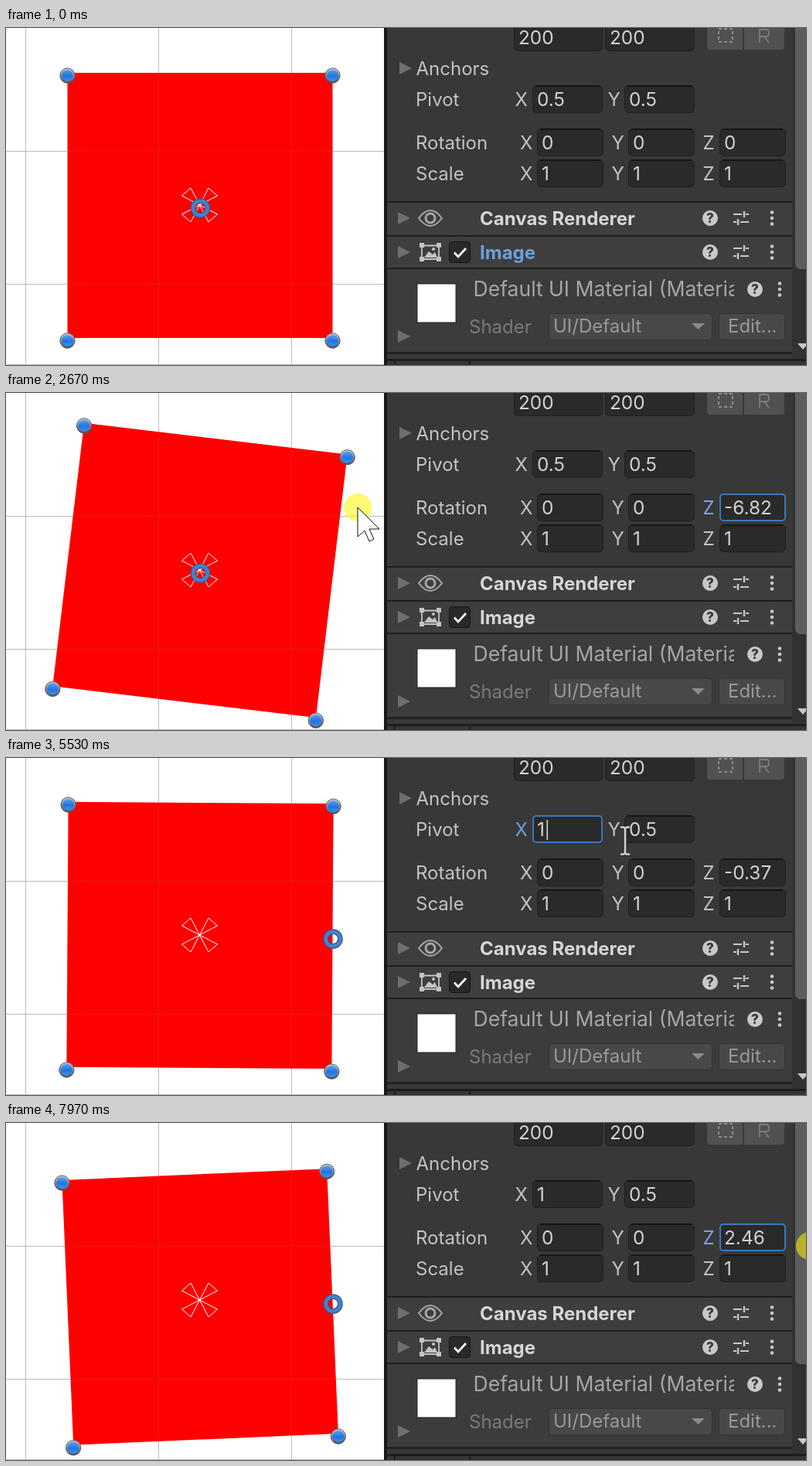
An HTML page that plays this animation: 1035x436 px, repeating every 8 s.

```html
<!DOCTYPE html>
<html lang="en">
<head>
<meta charset="utf-8">
<title>Rotation and pivot</title>
<style>
html, body { margin: 0; width: 100%; height: 100%; overflow: hidden; background: #fff; }
svg { display: block; width: 1035px; height: 436px; font-family: Inter, "Open Sans", sans-serif; }
text { white-space: pre; }
</style>
</head>
<body>
<svg id="stage" viewBox="0 0 1035 436" xmlns="http://www.w3.org/2000/svg"></svg>
<script>
const LOOP = 8000;
const stage = document.getElementById('stage');

// ---------- drawing helpers ----------
const rect = (x, y, w, h, fill, more = '') =>
  `<rect x="${x}" y="${y}" width="${w}" height="${h}" fill="${fill}" ${more}/>`;
const text = (x, y, s, fill = '#c4c4c4', size = 24, more = '') =>
  `<text x="${x}" y="${y}" fill="${fill}" font-size="${size}" ${more}>${s}</text>`;
const path = (d, fill, more = '') => `<path d="${d}" fill="${fill}" ${more}/>`;
const line = (d, color, w) => path(d, 'none', `stroke="${color}" stroke-width="${w}"`);

const fold = (x, y) => path(`M${x} ${y - 8}l16 8l-16 8z`, '#6e6e6e');

const BASE = 26.6; // text baseline below the top of a row
const field = (x, y, w, value, id = '') =>
  rect(x + .5, y + .5, w - 1, 35, '#2a2a2a', `rx="5" stroke="#1f1f1f"`) +
  line(`M${x + 4} ${y + 1}h${w - 8}`, '#101010', 1.5) +
  (id && rect(x + 5, y + 5, 42, 26, '#3d6091', `id="${id}Sel" visibility="hidden"`)) +
  text(x + 6, y + BASE, value, '#d2d2d2', 24.4, id && `id="${id}Val"`) +
  (id && rect(x + 1, y + 1, w - 2, 34, 'none', `rx="4" stroke="#3a79bb" stroke-width="2" id="${id}Focus"`));

const help = (x, y) => `<circle cx="${x}" cy="${y}" r="10" fill="#c8c8c8"/>` +
  text(x, y + 6, '?', '#383838', 17, 'font-weight="800" text-anchor="middle"');
const dots = (x, y) => [-7.5, 0, 7.5].map(d => `<circle cx="${x}" cy="${y + d}" r="2.3" fill="#c8c8c8"/>`).join('');
const sliders = (x, y) =>
  line(`M${x - 10} ${y - 5}h11M${x + 6} ${y - 5}h4M${x - 10} ${y + 5}h4M${x - 1} ${y + 5}h11`, '#c8c8c8', 2.2) +
  line(`M${x + 4} ${y - 9}v8M${x - 4} ${y + 1}v8`, '#c8c8c8', 2.4);
const headIcons = y => help(911, y) + sliders(951, y) + dots(991, y);

const ring = `<g id="ring"><circle r="9.4" fill="none" stroke="#35588c" stroke-width="6.8"/>
  <circle r="9.4" fill="none" stroke="#4680cc" stroke-width="4.4"/></g>`;
const blade = path('M0 0L11.5 -22L23 -12Z', 'none', 'stroke="#fff" stroke-width="1"');
const gizmo = [[1, 1], [-1, 1], [1, -1], [-1, -1]]
  .map(([a, b]) => `<g transform="translate(250.500 229) scale(${a} ${b})">${blade}</g>`).join('');
const knob = `<g class="knob"><circle r="10" fill="url(#rim)"/><circle r="9.6" fill="none" stroke="#4a5260" stroke-width=".8"/>
  <circle r="7.3" fill="url(#blue)"/></g>`;
const grid = alpha =>
  line('M25.5 0V436M197.500 0V436M369.500 0V436M0 159.500H489M0 331.500H489', `rgba(125,125,125,${alpha})`, 1);

const ARROW = 'M0 0V38L9 30L15 44L21 41L15 28H28Z';
const BEAM = 'M-6 -17.5H-2L0 -16L2 -17.5H6M0 -16V16M-6 17.5H-2L0 16L2 17.5H6';
const cursors = `<g id="pointer"><circle id="halo" r="18" fill="#fff500" fill-opacity=".55"/>
  <g id="arrow">${path(ARROW, '#fff', 'stroke="#111"')}</g>
  <g id="scrub">${path(ARROW, '#f2f2f2', 'stroke="#222" stroke-width="1.2" transform="translate(-1 -2) scale(.66)"')}
    ${path('M-11 3l6 -5v10zM16 3l-6 -5v10z', '#f2f2f2', 'stroke="#222" stroke-width=".6"')}</g>
  <g id="beam">${line(BEAM, '#2a2a2a', 5)}${line(BEAM, '#d0d0d0', 2.6)}</g></g>`;

// ---------- static layout ----------
function inspector() {
  const row = (y, label) => text(530, y + BASE, label);
  const axis = (x, y, s, id = '') => text(x, y + BASE, s, '#c4c4c4', 24, id && `id="${id}"`);
  const dark = '#1e1e1e';
  return rect(489, 0, 546, 436, '#383838') + rect(489, 0, 4, 436, '#191919') +
    // size, anchors, pivot
    field(657, -6, 115, '200') + field(775, -6, 116, '200') +
    rect(907, -10, 100, 38, '#515151', 'rx="4"') + rect(953, 0, 2, 28, '#383838') +
    rect(922, 1, 18, 17, 'none', 'stroke="#8c8c8c" stroke-width="2" stroke-dasharray="4 3"') +
    line('M975 19V2H984Q987 2 987 6.500T984 11H975M981 11L987 19', '#7c7c7c', 1.8) +
    fold(509, 52) + text(530.5, 60.7, 'Anchors') +
    row(74, 'Pivot') + axis(658.5, 74, 'X', 'pxLabel') + field(681, 74, 91, '0.5', 'px') +
    rect(699.5, 80, 1.5, 26, '#d8d8d8', 'id="caret"') +
    axis(778.5, 74, 'Y') + field(800, 74, 91, '0.5') +
    // rotation, scale
    ['Rotation', 'Scale'].map((s, i) => {
      const y = 130 + 40 * i;
      return row(y, s) + axis(665, y, 'X') + field(687, y, 86, i) +
        axis(783.5, y, 'Y') + field(805, y, 86, i) +
        axis(901.5, y, 'Z', i ? '' : 'rzLabel') + field(923, y, 86, i, i ? '' : 'rz');
    }).join('') +
    // component headers
    rect(493, 225, 524, 86, '#3e3e3e') +
    [224, 268, 310].map(y => rect(493, y, 524, 2, dark)).join('') +
    fold(507, 246) + fold(507, 290) +
    line('M534 246Q549 226 564 246Q549 266 534 246Z', '#a6a6a6', 2) +
    '<circle cx="549" cy="246" r="6" fill="#3e3e3e" stroke="#a6a6a6" stroke-width="3"/>' +
    text(613, 255, 'Canvas Renderer', '#d6d6d6', 24, 'font-weight="700"') +
    line('M538 281.500H560V299H538Z', '#c4c4c4', 1.8) +
    [[535, 278], [557, 278], [535, 296], [557, 296]].map(([x, y]) => rect(x, y, 6, 6, '#c4c4c4')).join('') +
    path('M541 297l6 -8l5 4l3 -3l3 7z', '#c4c4c4') + '<circle cx="553" cy="286" r="2" fill="#c4c4c4"/>' +
    rect(573.5, 276.5, 27, 27, '#292929', 'rx="4" stroke="#151515"') +
    line('M580 290.500L585 296L595 285', '#f2f2f2', 2.8) +
    text(613, 299, 'Image', '#d6d6d6', 24, 'font-weight="700" id="imgTitle"') +
    headIcons(246) + headIcons(290) +
    // material
    rect(493, 312, 524, 107, '#3c3c3c') +
    rect(531, 330, 52, 52, '#2e2e2e') + rect(532.5, 331.5, 49, 49, '#fff') +
    `<g clip-path="url(#matClip)">${text(604.5, 346.7, 'Default UI Material (Material)', '#a6a6a6', 26.55)}</g>` +
    help(969, 338) + dots(1001, 338) + fold(507, 399) +
    text(599, 394.6, 'Shader', '#7a7a7a') +
    rect(702.5, 369.5, 211, 34, '#484848', 'rx="4" stroke="#343434"') + text(708, 393.6, 'UI/Default', '#999') +
    path('M887 382h17l-8.5 8z', '#8a8a8a') +
    rect(922.5, 369.5, 85, 34, '#484848', 'rx="4" stroke="#343434"') + text(934, 393.6, 'Edit...', '#999') +
    // bottom strip and scrollbar
    rect(493, 419, 524, 3, '#222') + rect(493, 428, 542, 3, '#1d1d1d') + rect(493, 431, 542, 5, '#353535') +
    rect(502, 430, 2, 6, dark) + rect(599, 430, 2, 6, dark) +
    rect(1017, 0, 18, 428, '#323232') + rect(1021, -20, 24, 332, '#5d5d5d', 'rx="7"') +
    path('M1024 408h14l-7 8z', '#c8c8c8');
}

stage.innerHTML = `<defs>
  <linearGradient id="rim" x2="0" y2="1"><stop stop-color="#c3ccd6"/><stop offset="1" stop-color="#4a525e"/></linearGradient>
  <linearGradient id="blue" x2="0" y2="1"><stop stop-color="#5a9df0"/><stop offset=".55" stop-color="#1f74e2"/><stop offset="1" stop-color="#3a92f2"/></linearGradient>
  <clipPath id="matClip"><rect x="600" y="315" width="342" height="50"/></clipPath></defs>` +
  rect(0, 0, 490, 436, '#fff') + grid(.4) + path('', '#f00', 'id="square"') + grid(.2) +
  line('M0 435.500H489', '#bbb', 1) +
  gizmo + knob.repeat(4) + ring + inspector() + cursors;

const el = id => document.getElementById(id);
const knobs = [...document.querySelectorAll('.knob')];
const show = (id, on) => el(id).setAttribute('visibility', on ? 'visible' : 'hidden');
const move = (node, x, y) => node.setAttribute('transform', `translate(${x.toFixed(2)} ${y.toFixed(2)})`);

// ---------- motion ----------
const PRESS = 1420, RELEASE = 4135, SELECT = 4755, TYPE = 5385, GRAB = 7055;

const spin = [[1425, 0], [1630, .24], [2010, 4.5], [2670, -6.82], [3020, -.6], [3090, 1.5],
  [3160, 1.7], [3450, 5.2], [3930, -.85], [4070, -.37], [7068, -.37], [7200, .3], [7500, 4],
  [7770, 6.1], [7830, 5.9], [7970, 2.46]];
const route = [[330, 850, 445], [700, 822, 240], [880, 824, 138], [1090, 907, 150], [1425, 907, 150],
  [1630, 941, 148], [2010, 1235, 150], [2670, 455, 148], [3090, 1035, 150], [3160, 1042, 150],
  [3450, 1280, 156], [3930, 858, 170], [4070, 883, 172], [4140, 884, 172], [4620, 752, 91],
  [4880, 752, 91], [5040, 801, 107], [5560, 801, 107], [6100, 960, 140], [6500, 825, 150],
  [6800, 907, 150], [7068, 907, 150], [7200, 945, 152], [7770, 1205, 158], [7970, 1040, 159]];

// monotone cubic through keys [time, value, ...]
function along(keys, t, k = 1) {
  const last = keys.length - 1;
  if (t <= keys[0][0]) return keys[0][k];
  if (t >= keys[last][0]) return keys[last][k];
  const i = keys.findIndex(p => p[0] > t) - 1;
  const slope = j => j < 0 || j >= last ? 0 : (keys[j + 1][k] - keys[j][k]) / (keys[j + 1][0] - keys[j][0]);
  const tangent = j => {
    const a = slope(j - 1), b = slope(j);
    return a * b <= 0 ? 0 : 2 * a * b / (a + b);
  };
  const h = keys[i + 1][0] - keys[i][0], u = (t - keys[i][0]) / h, v = 1 - u;
  return keys[i][k] * v * v * (1 + 2 * u) + keys[i + 1][k] * u * u * (3 - 2 * u) +
    h * u * v * (tangent(i) * v - tangent(i + 1) * u);
}

const marks = [330, 1630, 2670, 4070, 5530, 6930, 7970];
function snap(t) {
  if (t < marks[0]) return 0;
  const i = marks.findLastIndex(m => m <= t);
  if (i === marks.length - 1) return marks[i];
  const span = marks[i + 1] - marks[i], step = span / Math.round(span / 69.4);
  return marks[i] + Math.floor((t - marks[i]) / step + 1e-6) * step;
}

const inside = (x, y, l, t, r, b) => x >= l && x <= r && y >= t && y <= b;
function hover(x, y) {
  const rows = (y >= 130 && y <= 166) || (y >= 170 && y <= 206);
  if (inside(x, y, 681, 74, 772, 110) || inside(x, y, 800, 74, 891, 110)) return 'beam';
  if (rows && [[687, 773], [805, 891], [923, 1009]].some(([l, r]) => x >= l && x <= r)) return 'beam';
  if (rows && x > 780 && x < 923 || inside(x, y, 776, 74, 800, 110)) return 'scrub';
  return 'arrow';
}

const HALF = 171.5;
const corners = [[-HALF, -HALF], [HALF, -HALF], [HALF, HALF], [-HALF, HALF]];
function drawSquare(deg, edge) {
  const turn = (a, [x, y]) => {
    const c = Math.cos(a), s = Math.sin(a);
    return [x * c + y * s, y * c - x * s];
  };
  const rad = deg * Math.PI / 180;
  let cx = 251, cy = 229.4, px = cx, py = cy;
  if (edge) {
    const [ax, ay] = turn(-.37 * Math.PI / 180, [HALF, 0]);
    px = cx + ax; py = cy + ay;
    const [bx, by] = turn(rad, [-HALF, 0]);
    cx = px + bx; cy = py + by;
  }
  const pts = corners.map(p => turn(rad, p)).map(([x, y]) => [cx + x, cy + y]);
  el('square').setAttribute('d', 'M' + pts.map(p => p.map(n => n.toFixed(2)).join(' ')).join('L') + 'Z');
  pts.forEach(([x, y], i) => move(knobs[i], x, y + 3.6));
  move(el('ring'), px + .5, py + 3.6);
}

function draw(time) {
  const t = snap(time);
  const deg = along(spin, t), typed = t >= TYPE;
  const rotating = (t >= PRESS && t < RELEASE) || t >= GRAB;
  const zFocus = (t >= PRESS && t < SELECT) || t >= GRAB;
  const xFocus = t >= SELECT && t < GRAB;

  drawSquare(deg, typed);
  el('rzVal').textContent = t < PRESS ? '0' : String(+deg.toFixed(2));
  el('pxVal').textContent = typed ? '1' : '0.5';
  el('rzLabel').setAttribute('fill', zFocus ? '#7fa3e2' : '#c4c4c4');
  el('pxLabel').setAttribute('fill', xFocus ? '#6f9fdd' : '#c4c4c4');
  el('imgTitle').setAttribute('fill', t < PRESS ? '#6e9fdc' : '#d6d6d6');
  show('rzFocus', zFocus);
  show('pxFocus', xFocus);
  show('pxSel', xFocus && !typed);
  show('caret', xFocus && typed);

  const x = along(route, t, 1), y = along(route, t, 2);
  const kind = rotating ? 'arrow' : hover(x, y);
  move(el('pointer'), x, y);
  ['arrow', 'scrub', 'beam'].forEach(k => show(k, t > 0 && k === kind));
  show('halo', rotating || (t >= SELECT && t < 4890));
}

const begin = performance.now();
function tick() {
  draw((performance.now() - begin) % LOOP);
  requestAnimationFrame(tick);
}
tick();
</script>
</body>
</html>
```
